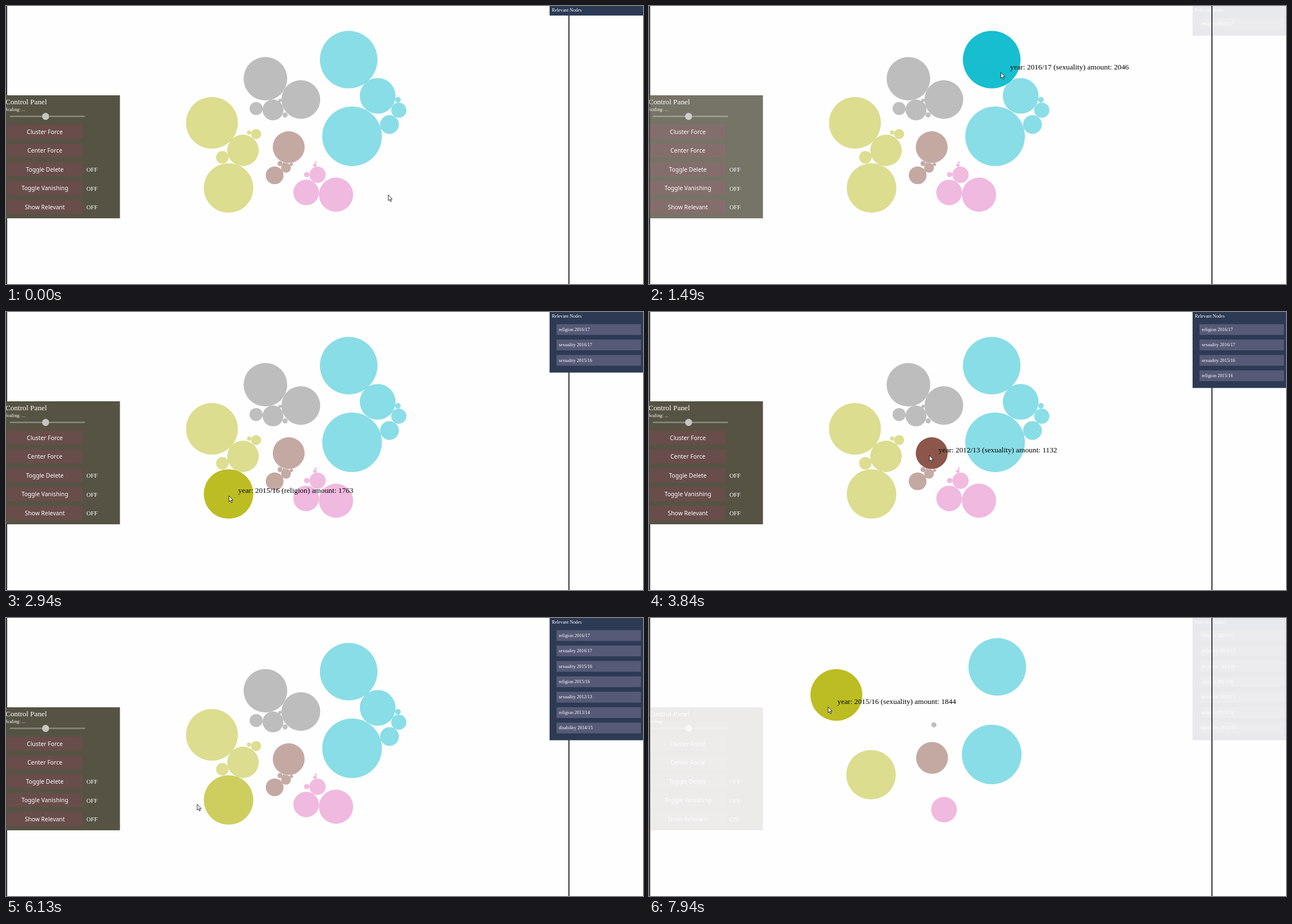
An HTML page that plays this animation: 1132 px wide and 495 px high, repeating every 7990 ms.

```html
<!DOCTYPE html>
<html lang="en">
<head>
<meta charset="utf-8">
<title>Cluster bubbles</title>
<style>
html, body { margin: 0; width: 100%; height: 100%; overflow: hidden; background: #fefefe; }
svg { display: block; width: 100vw; height: 100vh; }
text { font-family: "Liberation Serif", "Times New Roman", serif; white-space: pre; }
.label { font-family: "Noto Sans", "Open Sans", sans-serif; font-size: 10.4px; text-anchor: middle; }
</style>
</head>
<body>
<svg id="stage" viewBox="0 0 1132 495" preserveAspectRatio="none"></svg>
<script>
const LOOP = 7990, FILTER_AT = 6900, SETTLE = 1000, FADE = 340, HOVER = 90;
const stage = document.getElementById('stage');

function add(parent, tag, attrs, text) {
  const el = document.createElementNS('http://www.w3.org/2000/svg', tag);
  for (const k in attrs) el.setAttribute(k, attrs[k]);
  if (text) el.textContent = text;
  parent.appendChild(el);
  return el;
}
const clamp = v => Math.max(0, Math.min(1, v));
const smooth = u => u * u * (3 - 2 * u);
const mix = (a, b, u) => a + (b - a) * u;

// Each node: x, y, radius, category and, when relevant, its settled place.
const clusters = [
  { year: '2016/17', color: '#17becf', nodes: [
    [609, 95.5, 51.15, 'sexuality', 619, 87],
    [660.5, 160, 31.8, 'disability'],
    [615, 232, 53, 'religion', 609, 243],
    [696.5, 167, 5, 'age'],
    [698, 185.5, 13.5, 'transgender'],
    [681.5, 211, 16.7, 'other']] },
  { year: '2014/15', color: '#7f7f7f', nodes: [
    [461, 129.5, 38.8, 'sexuality'],
    [524, 166.5, 34.4, 'religion'],
    [444.5, 182.5, 11.6, 'transgender'],
    [474.5, 185, 18.6, 'other'],
    [487, 168, 3, 'age'],
    [496, 194, 4.5, 'disability', 506.3, 190.3]] },
  { year: '2015/16', color: '#bcbd22', nodes: [
    [366, 208, 46.1, 'sexuality', 352, 199],
    [421.2, 257, 28, 'disability'],
    [395.5, 324, 44.08, 'religion', 394.5, 279],
    [444.5, 228, 9, 'transgender'],
    [432, 225.3, 3.7, 'age'],
    [384.5, 269.3, 11.1, 'other']] },
  { year: '2012/13', color: '#8c564b', nodes: [
    [502.4, 251.3, 28.3, 'sexuality', 503, 249],
    [477.4, 301.5, 15.8, 'religion'],
    [497.6, 288, 8.7, 'disability'],
    [487, 280.6, 4.5, 'transgender'],
    [507.3, 282, 2.8, 'other'],
    [493.5, 279.5, 1.5, 'age']] },
  { year: '2013/14', color: '#e377c2', nodes: [
    [533.4, 332, 22.8, 'religion', 524.3, 341.3],
    [586.5, 336, 30.4, 'sexuality'],
    [553.6, 300.5, 14.4, 'disability'],
    [534.4, 300.2, 4.8, 'transgender'],
    [549, 283.4, 3, 'other'],
    [550.5, 278.6, 1.8, 'age']] }
];

// Pointer stops: time, x, y; a fourth value marks a move at constant speed.
const path = [
  [0, 679, 336], [280, 679, 336], [620, 644, 235], [890, 644, 235],
  [1300, 625, 118], [1600, 625, 118], [2150, 368, 215], [2420, 368, 215],
  [2850, 396, 327], [3220, 396, 327], [3750, 498, 255], [3980, 498, 255],
  [4290, 544, 332], [4600, 544, 332], [5250, 497.5, 198], [5300, 496, 195],
  [5960, 496, 195], [6060, 425, 285, 1], [6130, 340, 331, 1],
  [6350, 220, 412, 1], [6500, 140, 390, 1], [6720, 75, 360], [6960, 75, 360],
  [7420, 338, 221], [7500, 338, 221], [7900, 318, 158], [LOOP, 318, 158]
];

const presses = [[760, 870], [1390, 1570], [2260, 2390], [3070, 3190],
  [3870, 3940], [4440, 4560], [5400, 5520], [7480, 9000]];
const picked = ['religion 2016/17', 'sexuality 2016/17', 'sexuality 2015/16',
  'religion 2015/16', 'sexuality 2012/13', 'religion 2013/14', 'disability 2014/15'];
const dragAt = presses[7][0];

// Frame lines
for (const x of [0.4, 999.6]) add(stage, 'rect', { x, y: 0, width: 1.6, height: 495, fill: '#000' });

const nodes = clusters.flatMap(c => c.nodes.map(([x, y, r, kind, tx, ty]) => ({
  x, y, r, tx, ty,
  relevant: tx !== undefined,
  dragged: kind === 'sexuality' && c.year === '2015/16',
  info: `year: ${c.year} (${kind}) amount: ${Math.round(r * 40)}`,
  el: add(stage, 'circle', { r, fill: c.color })
})));

// Control panel
const control = add(stage, 'g', { fill: '#fff' });
add(control, 'rect', { x: 0, y: 159, width: 202.5, height: 219, fill: '#565344' });
add(control, 'text', { x: -1, y: 175, 'font-size': 13.33 }, 'Control Panel');
add(control, 'text', { x: -1.5, y: 187, 'font-size': 8.33 }, 'Scaling: ...');
add(control, 'rect', { x: 6.5, y: 195.3, width: 134, height: 2.5, rx: 1, fill: '#8b8a80' });
add(control, 'circle', { cx: 70.4, cy: 196.6, r: 6.3, fill: '#c6c5c0' });
let showButton, showState;
['Cluster Force', 'Center Force', 'Toggle Delete', 'Toggle Vanishing', 'Show Relevant'].forEach((name, i) => {
  const y = 211 + i * 33.5;
  showButton = add(control, 'rect', { x: 2, y, width: 134, height: 25.3, fill: '#684d4a' });
  add(control, 'text', { x: 69, y: y + 16.7, class: 'label' }, name);
  if (i > 1) showState = add(control, 'text', { x: 143, y: y + 17, 'font-size': 10.83 }, 'OFF');
});

// Relevant list
const list = add(stage, 'g', { fill: '#fff', 'font-size': 8.33 });
const listBack = add(list, 'rect', { x: 966, y: 0, width: 166, fill: '#2c3a54' });
add(list, 'text', { x: 970, y: 10 }, 'Relevant Nodes');
const rows = picked.map((name, i) => {
  const row = add(list, 'g', { transform: `translate(978.3 ${21.6 + i * 27.45})` });
  add(row, 'rect', { width: 150, height: 19.2, fill: '#565a77' });
  add(row, 'text', { x: 4, y: 12 }, name);
  return row;
});

const tip = add(stage, 'text', { 'font-size': 13.33, fill: '#000' });
const pointer = add(stage, 'path', {
  d: 'M.3 .3V10.6L2.6 8.5 4.3 12.4 6 11.6 4.3 7.9H7.4Z',
  fill: '#fff', stroke: '#000', 'stroke-width': 0.8
});

function pointerAt(t) {
  let i = 1;
  while (i < path.length - 1 && path[i][0] < t) i++;
  const a = path[i - 1], b = path[i];
  const u = clamp((t - a[0]) / (b[0] - a[0])), e = b[3] ? u : smooth(u);
  return [mix(a[1], b[1], e), mix(a[2], b[2], e)];
}

function placeAt(n, t, p) {
  if (!n.relevant || t < FILTER_AT) return [n.x, n.y];
  if (n.dragged && t >= dragAt) return [p[0] + 15, p[1] - 21];
  const e = 1 - (1 - clamp((t - FILTER_AT) / SETTLE)) ** 3;
  return [mix(n.x, n.tx, e), mix(n.y, n.ty, e)];
}

const visible = (n, t) => t < FILTER_AT || n.relevant;

function hoveredAt(t) {
  const p = pointerAt(t);
  return nodes.find(n => {
    const [x, y] = placeAt(n, t, p);
    return visible(n, t) && Math.hypot(x - p[0], y - p[1]) < n.r;
  });
}

// Replays the last moments of hovering, so opacity depends on time alone.
function glowAt(t) {
  const glow = new Map(), step = 5;
  for (let s = t - 3 * HOVER; s <= t; s += step) {
    const over = s < 0 ? null : hoveredAt(s);
    if (over && !glow.has(over)) glow.set(over, 0);
    for (const [n, g] of glow) glow.set(n, clamp(g + (n === over ? step : -step) / HOVER));
  }
  return glow;
}

function fadeAt(t) {
  let u = 0;
  for (const [down, up] of presses) {
    if (t < down) break;
    u = t < up ? clamp((t - down) / FADE) : clamp(Math.min(1, (up - down) / FADE) - (t - up) / FADE);
  }
  return smooth(u);
}

function draw(t) {
  const p = pointerAt(t), over = hoveredAt(t), glow = glowAt(t);
  for (const n of nodes) {
    const [x, y] = placeAt(n, t, p);
    n.el.setAttribute('cx', x);
    n.el.setAttribute('cy', y);
    n.el.setAttribute('opacity', visible(n, t) ? 0.5 + 0.5 * (glow.get(n) || 0) : 0);
  }

  const pressed = presses.some(([down, up]) => t >= down && t < up);
  const count = presses.filter(([, up]) => t >= up).length;
  control.setAttribute('opacity', 1 - 0.9 * fadeAt(t));
  list.setAttribute('opacity', pressed ? 0.1 : 1);
  listBack.setAttribute('height', count ? 25.5 + 27.45 * count : 17);
  rows.forEach((row, i) => row.setAttribute('visibility', i < count ? 'visible' : 'hidden'));

  const onButton = p[0] > 2 && p[0] < 136 && p[1] > 345 && p[1] < 370;
  showButton.setAttribute('fill', onButton ? '#7a5c59' : '#684d4a');
  showState.textContent = t < FILTER_AT ? 'OFF' : 'ON';

  tip.textContent = over ? over.info : '';
  tip.setAttribute('x', p[0] + 16.8);
  tip.setAttribute('y', p[1] - 5);
  pointer.setAttribute('transform', `translate(${p[0]} ${p[1]})`);
}

const start = performance.now();
function tick() {
  draw((performance.now() - start) % LOOP);
  requestAnimationFrame(tick);
}
tick();
</script>
</body>
</html>
```
